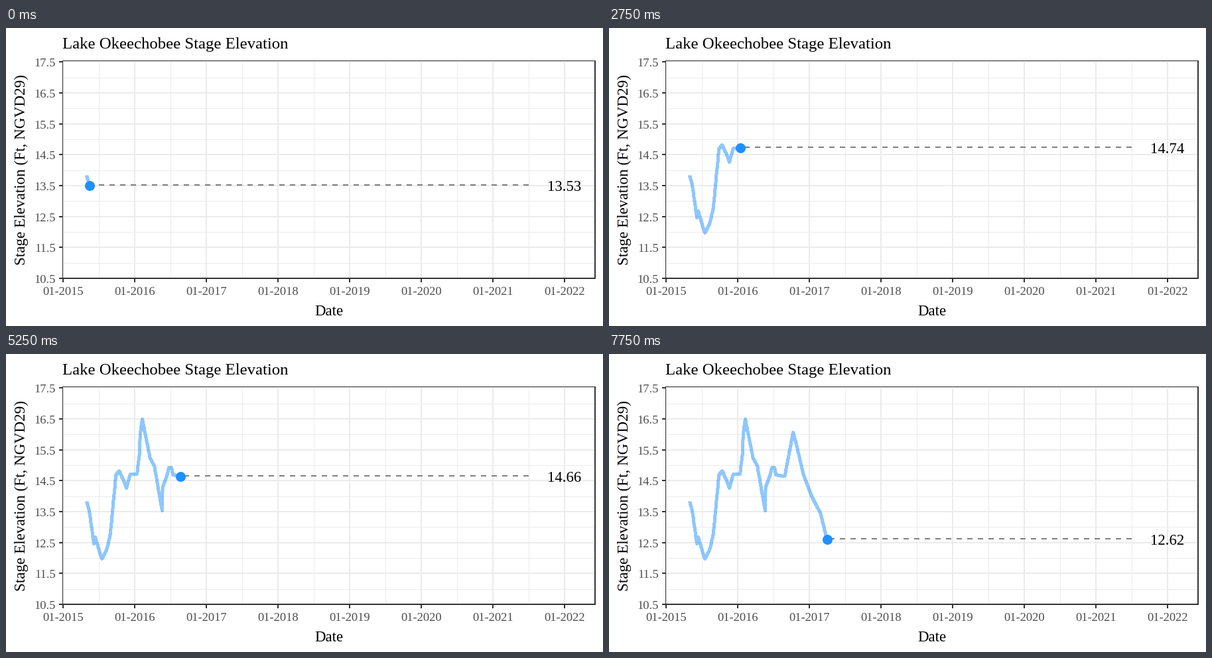
Write a matplotlib script that moves like this. It is 900 px wide and 450 px high and loops after 8 s.

```python
import numpy as np
import matplotlib.pyplot as plt
from matplotlib.animation import FuncAnimation
from matplotlib.patches import Rectangle

W, H = 900, 450
FRAMES, INTERVAL = 32, 250
LEFT, RIGHT, TOP, BOTTOM = 85, 889, 49, 379
DASH_END, LABEL_X = 788, 842
FIRST_DAY, DAY_STEP = 134, 22.125

GRID, DARK, TICK_TEXT, BLUE = "#EBEBEB", "#333333", "#4D4D4D", "#1E90FF"

# Turning points of the lake level: days since 2015-01-01, feet
KEYS = [
    (120, 13.84), (134, 13.53), (157, 12.48), (164, 12.68), (198, 11.97),
    (222.5, 12.28), (241, 12.78), (270, 14.7), (286, 14.83), (311, 14.49),
    (323, 14.27), (343, 14.73), (377, 14.72), (389, 15.35), (394, 16.05),
    (404, 16.5), (443.75, 15.25), (466, 14.98), (505, 13.55), (508, 14.3),
    (532.25, 14.72), (539, 14.93), (553, 14.93), (561, 14.7), (605, 14.65),
    (648, 16.07), (665, 15.68), (700, 14.72), (741, 14.03), (788, 13.45),
    (819.875, 12.62),
]
key_days, key_feet = zip(*KEYS)


def level_at(day):
    return np.interp(day, key_days, key_feet)


def px(day):
    return 85.5 + day * 756 / 2557


def py(level):
    return 378 - (level - 10.5) * 46.65


def pixel(v):
    """Centre of the pixel that holds v."""
    return np.round(v) + 0.5


plt.rcParams["font.family"] = "Liberation Serif"
plt.rcParams["text.hinting"] = "native"
# At 72 dpi one point is one pixel
fig = plt.figure(figsize=(W / 72, H / 72), dpi=72, facecolor="white")
ax = fig.add_axes([0, 0, 1, 1])
ax.set_xlim(0, W)
ax.set_ylim(H, 0)
ax.axis("off")


def box(x0, y0, x1, y1, color, z):
    ax.add_patch(Rectangle((x0, y0), x1 - x0, y1 - y0, facecolor=color,
                           linewidth=0, antialiased=False, zorder=z))


def text(x, y, s, size, color="black", **kw):
    return ax.text(x, y, s, fontsize=size, color=color, va="baseline",
                   zorder=6, **kw)


def draw_panel():
    for i in range(7):
        x = 140 + 108 * i
        box(x, TOP, x + 1, BOTTOM, GRID, 1)
        y = round(py(11 + i))
        box(LEFT, y, RIGHT, y + 1, GRID, 1)

    for i in range(8):
        x = 86 + 108 * i
        box(x - 1, TOP, x + 1, BOTTOM, GRID, 1)
        box(x - 1, BOTTOM, x + 1, BOTTOM + 5, DARK, 5)
        text(x, 403, f"01-{2015 + i}", 18.33, TICK_TEXT, ha="center")

        level = 10.5 + i
        y = round(py(level))
        box(LEFT, y - 1, RIGHT, y + 1, GRID, 1)
        box(LEFT - 5, y - 1, LEFT, y + 1, DARK, 5)
        text(75, y + 7, f"{level:.1f}", 18.33, TICK_TEXT, ha="right")

    box(LEFT, TOP, LEFT + 1, BOTTOM, DARK, 5)
    box(LEFT, TOP, RIGHT, TOP + 1, DARK, 5)
    box(RIGHT - 2, TOP, RIGHT, BOTTOM, DARK, 5)
    box(LEFT, BOTTOM - 2, RIGHT, BOTTOM, DARK, 5)

    text(85, 31, "Lake Okeechobee Stage Elevation", 24.8)
    text(487, 434, "Date", 22.9, ha="center")
    text(29, 214, "Stage Elevation (Ft, NGVD29)", 23.1, ha="center",
         rotation=90, rotation_mode="anchor")


draw_panel()
dash, = ax.plot([], [], color="#7F7F7F", lw=2, zorder=2,
                linestyle=(0, (4, 4)), dash_capstyle="butt")
trail, = ax.plot([], [], color=BLUE, alpha=0.5, lw=5, zorder=3,
                 solid_capstyle="butt", solid_joinstyle="round")
dot, = ax.plot([], [], "o", color=BLUE, ms=15, mew=0, zorder=4)
label = text(LABEL_X, 0, "", 22.7, ha="center")


def update(frame):
    today = FIRST_DAY + DAY_STEP * frame
    days = np.append(np.arange(key_days[0], today), today)
    levels = level_at(days)
    xs, ys = pixel(px(days)), pixel(py(levels))
    x, y = xs[-1], ys[-1]
    trail.set_data(xs, ys)
    # Dashes are counted from the fixed right end
    dash.set_data([DASH_END, x], [y - 0.5, y - 0.5])
    dot.set_data([x], [y])
    label.set_text(f"{levels[-1]:.2f}")
    label.set_y(y + 8.5)
    return trail, dash, dot, label


anim = FuncAnimation(fig, update, frames=FRAMES, interval=INTERVAL,
                     repeat=True, repeat_delay=0, blit=False)
plt.show()
```
